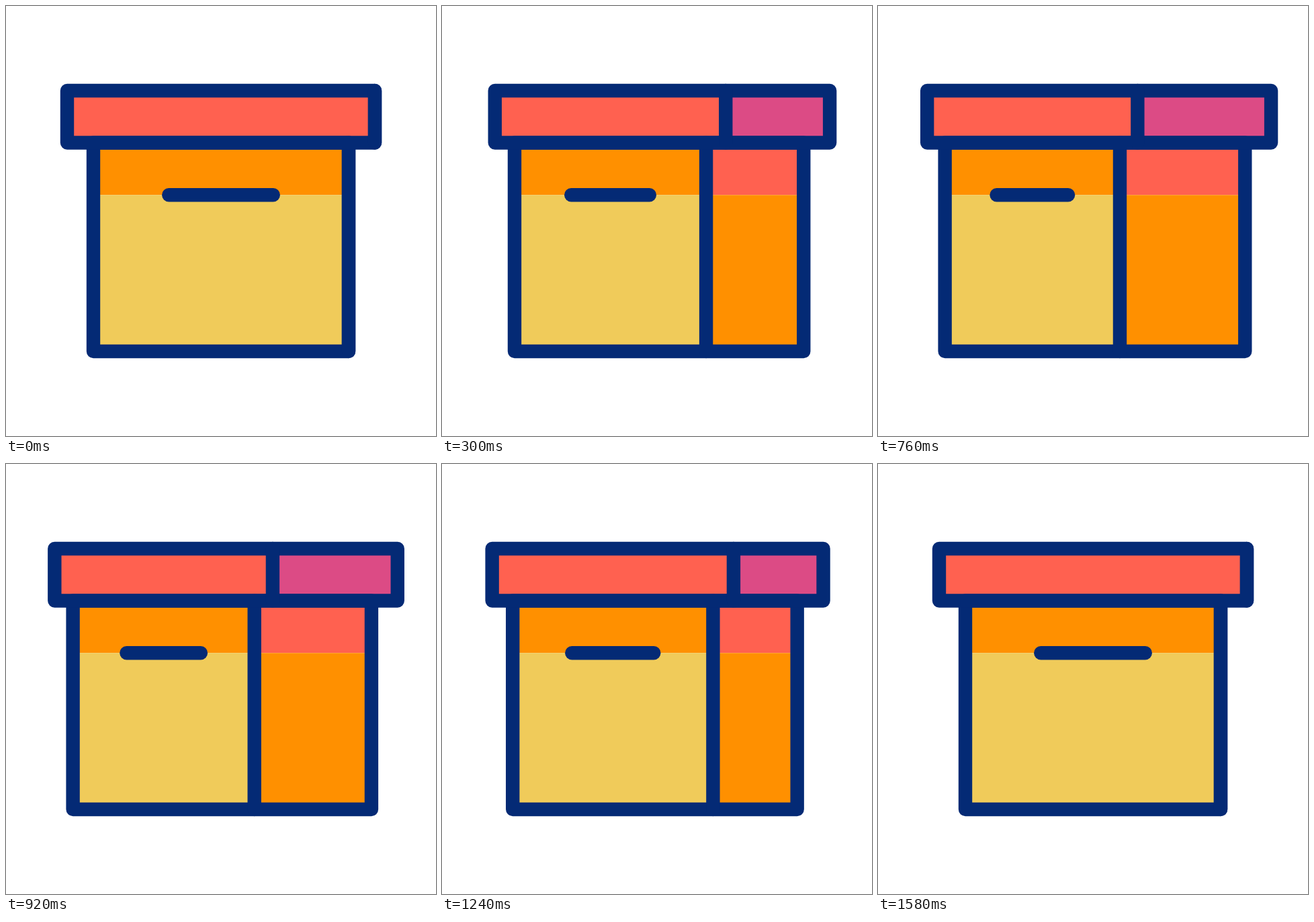
An HTML page with a canvas for the animation above (2.4 s loop, 640x640 px).

```html
<!DOCTYPE html>
<html>
<head>
<meta charset="utf-8">
<style>
  html, body { margin: 0; width: 100%; height: 100%; overflow: hidden; background: #fff; }
  canvas { display: block; width: 640px; height: 640px; }
</style>
</head>
<body>
<canvas width="640" height="640"></canvas>
<script>
const ctx = document.querySelector('canvas').getContext('2d');
const LOOP = 2400, OPEN = 455, CLOSED = 1580, DRIFT = 5.8;
const NAVY = '#042a75', RED = '#ff6150', PINK = '#dc4b85', ORANGE = '#ff9000', YELLOW = '#f0cb5a';
const LID_TOP = 126, LID_BOTTOM = 203.5, BAND = 281.3, BASE = 514;

function ease(t, start, end) {
  const u = Math.min(1, Math.max(0, (t - start) / (end - start)));
  return u * u * (3 - 2 * u);
}

// The box turns open, then closes slowly at first and faster at the end.
function turnAt(t) {
  return ease(t, 0, OPEN) - 0.32 * ease(t, OPEN, CLOSED) - 0.68 * ease(t, 1120, CLOSED);
}

function fill(color, x1, y1, x2, y2) {
  ctx.fillStyle = color;
  ctx.fillRect(x1, y1, x2 - x1, y2 - y1);
}

function line(x1, y1, x2, y2) {
  ctx.beginPath();
  ctx.moveTo(x1, y1);
  ctx.lineTo(x2, y2);
  ctx.stroke();
}

function outline([left, edge, right], top, bottom) {
  ctx.strokeRect(left, top, right - left, bottom - top);
  line(edge, top, edge, bottom);
}

function draw(t) {
  const turn = turnAt(t);
  // The left edge slides first, the right side follows, and both return together.
  const back = ease(t, 1260, CLOSED);
  const driftLeft = DRIFT * (back - ease(t, OPEN, 1200));
  const driftRight = DRIFT * (back - ease(t, 1000, 1260));
  const corners = (left, right, moveLeft, moveEdge, moveRight) => [
    left - moveLeft * turn + driftLeft,
    right - moveEdge * turn + driftRight,
    right + moveRight * turn + driftRight
  ];
  const lid = corners(91, 549, 16.7, 172.7, 38.3);
  const body = corners(130, 510, 30, 159.3, 38.5);
  const [left, edge, right] = body;
  const inset = 0.2955 * (edge - left);

  fill('#fff', 0, 0, 640, 640);
  fill(ORANGE, left, LID_BOTTOM, edge, BAND);
  fill(YELLOW, left, BAND, edge, BASE);
  fill(RED, edge, LID_BOTTOM, right, BAND);
  fill(ORANGE, edge, BAND, right, BASE);
  fill(RED, lid[0], LID_TOP, lid[1], LID_BOTTOM);
  fill(PINK, lid[1], LID_TOP, lid[2], LID_BOTTOM);

  ctx.strokeStyle = NAVY;
  ctx.lineWidth = 20.4;
  ctx.lineJoin = ctx.lineCap = 'round';
  outline(body, LID_BOTTOM, BASE);
  outline(lid, LID_TOP, LID_BOTTOM);
  line(left + inset, BAND, edge - inset, BAND);
}

function frame() {
  draw(performance.now() % LOOP);
  requestAnimationFrame(frame);
}
frame();
</script>
</body>
</html>
```
